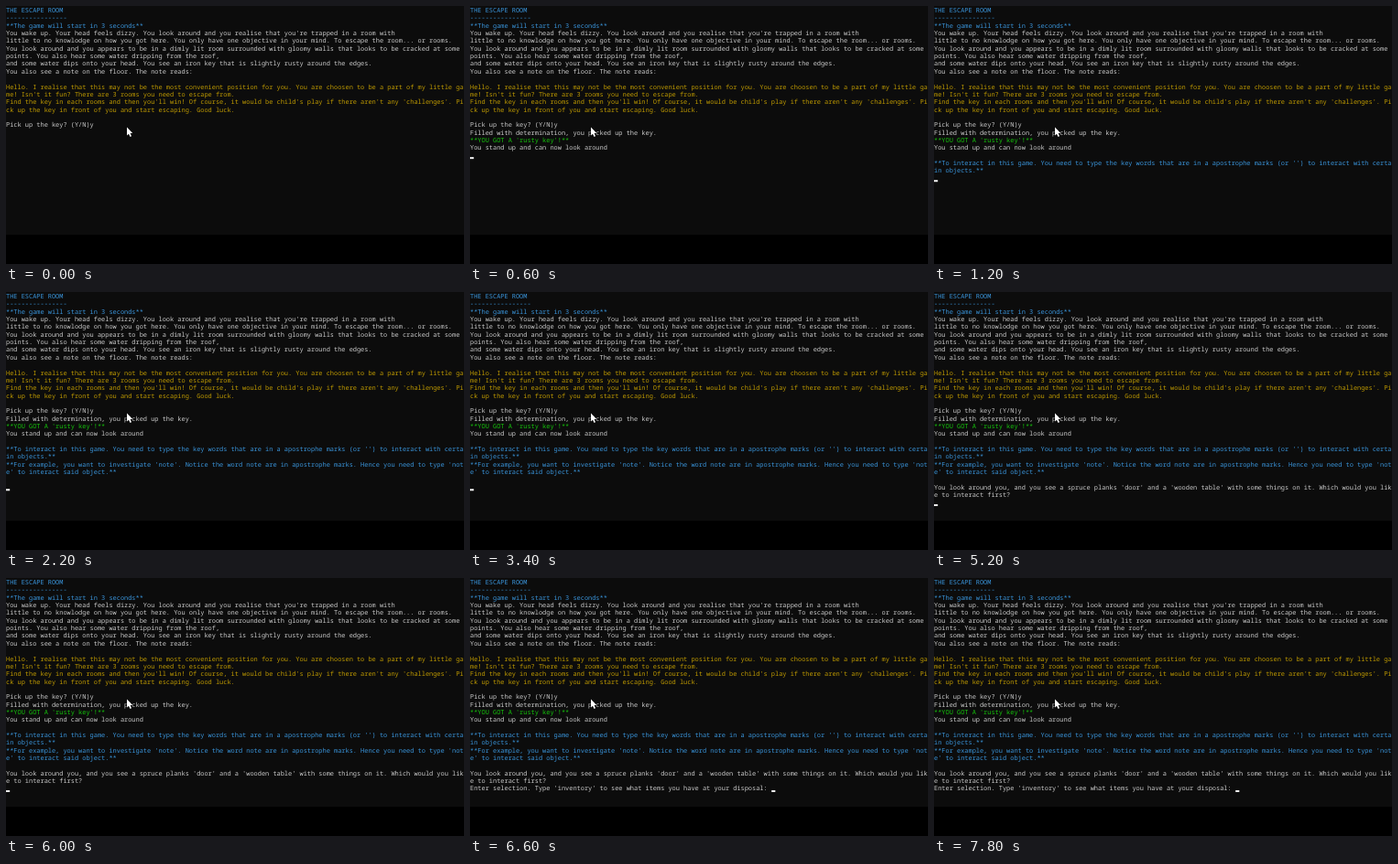
An HTML page with a canvas that plays this animation: 500x282 px, repeating every 8000 ms.

```html
<!DOCTYPE html>
<html lang="en">
<head>
<meta charset="utf-8">
<title>The Escape Room</title>
<style>
  html, body { margin: 0; width: 100%; height: 100%; overflow: hidden; background: #000; }
  canvas { display: block; width: 500px; height: 282px; }
</style>
</head>
<body>
<canvas id="stage" width="500" height="282"></canvas>
<script>
const ctx = document.getElementById('stage').getContext('2d');

const LOOP = 8000;
const COLUMN = 500 / 120;
const ROW = 8.35;
const BASELINE = 7;
const FAMILY = '"Noto Sans Mono", "DejaVu Sans Mono", monospace';

const WHITE = '#cccccc', BLUE = '#3a96dd', GOLD = '#c19c00', GREEN = '#16c60c';

// Each block is printed at once: time, then [colour, rows...] groups.
const blocks = [
  { at: 0, groups: [
    [BLUE,
      'THE ESCAPE ROOM',
      '----------------',
      '**The game will start in 3 seconds**'],
    [WHITE,
      "You wake up. Your head feels dizzy. You look around and you realise that you're trapped in a room with",
      'little to no knowlodge on how you got here. You only have one objective in your mind. To escape the room... or rooms.',
      'You look around and you appears to be in a dimly lit room surrounded with gloomy walls that looks to be cracked at some',
      'points. You also hear some water dripping from the roof,',
      'and some water dips onto your head. You see an iron key that is slightly rusty around the edges.',
      'You also see a note on the floor. The note reads:',
      ''],
    [GOLD,
      'Hello. I realise that this may not be the most convenient position for you. You are choosen to be a part of my little ga',
      "me! Isn't it fun? There are 3 rooms you need to escape from.",
      "Find the key in each rooms and then you'll win! Of course, it would be child's play if there aren't any 'challenges'. Pi",
      'ck up the key in front of you and start escaping. Good luck.',
      ''],
    [WHITE, 'Pick up the key? (Y/N)y']
  ] },
  { at: 200, cursor: [0, 19], groups: [
    [WHITE, 'Filled with determination, you picked up the key.'],
    [GREEN, "**YOU GOT A 'rusty key'!**"],
    [WHITE, 'You stand up and can now look around', '']
  ] },
  { at: 1000, cursor: [0, 22], groups: [
    [BLUE,
      "**To interact in this game. You need to type the key words that are in a apostrophe marks (or '') to interact with certa",
      'in objects.**']
  ] },
  { at: 2000, cursor: [0, 25], groups: [
    [BLUE,
      "**For example, you want to investigate 'note'. Notice the word note are in apostrophe marks. Hence you need to type 'not",
      "e' to interact said object.**",
      '']
  ] },
  { at: 5000, cursor: [0, 27], groups: [
    [WHITE,
      "You look around you, and you see a spruce planks 'door' and a 'wooden table' with some things on it. Which would you lik",
      'e to interact first?']
  ] },
  { at: 6200, cursor: [79, 27], groups: [
    [WHITE, "Enter selection. Type 'inventory' to see what items you have at your disposal: "]
  ] }
];

// Choose the font size whose advance equals one terminal column.
ctx.textRendering = 'geometricPrecision';
ctx.font = `100px ${FAMILY}`;
const fontSize = 100 * COLUMN / (ctx.measureText('0'.repeat(20)).width / 20);

const baseline = row => BASELINE + row * ROW;

function drawPointer(x, y) {
  const outline = [[0, 0], [0, 9], [2, 7.2], [3.5, 10.4], [5, 9.7], [3.6, 6.6], [6.2, 6.4]];
  ctx.beginPath();
  for (const [dx, dy] of outline) ctx.lineTo(x + dx, y + dy);
  ctx.closePath();
  ctx.lineWidth = 1;
  ctx.strokeStyle = '#0c0c0c';
  ctx.stroke();
  ctx.fillStyle = '#ffffff';
  ctx.fill();
}

function draw(time) {
  ctx.fillStyle = '#000000';
  ctx.fillRect(0, 0, 500, 282);
  ctx.fillStyle = '#0c0c0c';
  ctx.fillRect(0, 0, 500, 250);

  ctx.font = `${fontSize}px ${FAMILY}`;
  let row = 0, cursor;
  for (const block of blocks) {
    if (time < block.at) break;
    cursor = block.cursor;
    for (const [color, ...lines] of block.groups) {
      ctx.fillStyle = color;
      for (const line of lines) ctx.fillText(line, 0, baseline(row++));
    }
  }

  if (cursor) {
    ctx.fillStyle = '#f2f2f2';
    ctx.fillRect(cursor[0] * COLUMN, baseline(cursor[1]) - 0.5, COLUMN, 2);
  }
  drawPointer(132, 132.5);
}

const start = performance.now();
function tick() {
  draw((performance.now() - start) % LOOP);
  requestAnimationFrame(tick);
}
tick();
</script>
</body>
</html>
```
